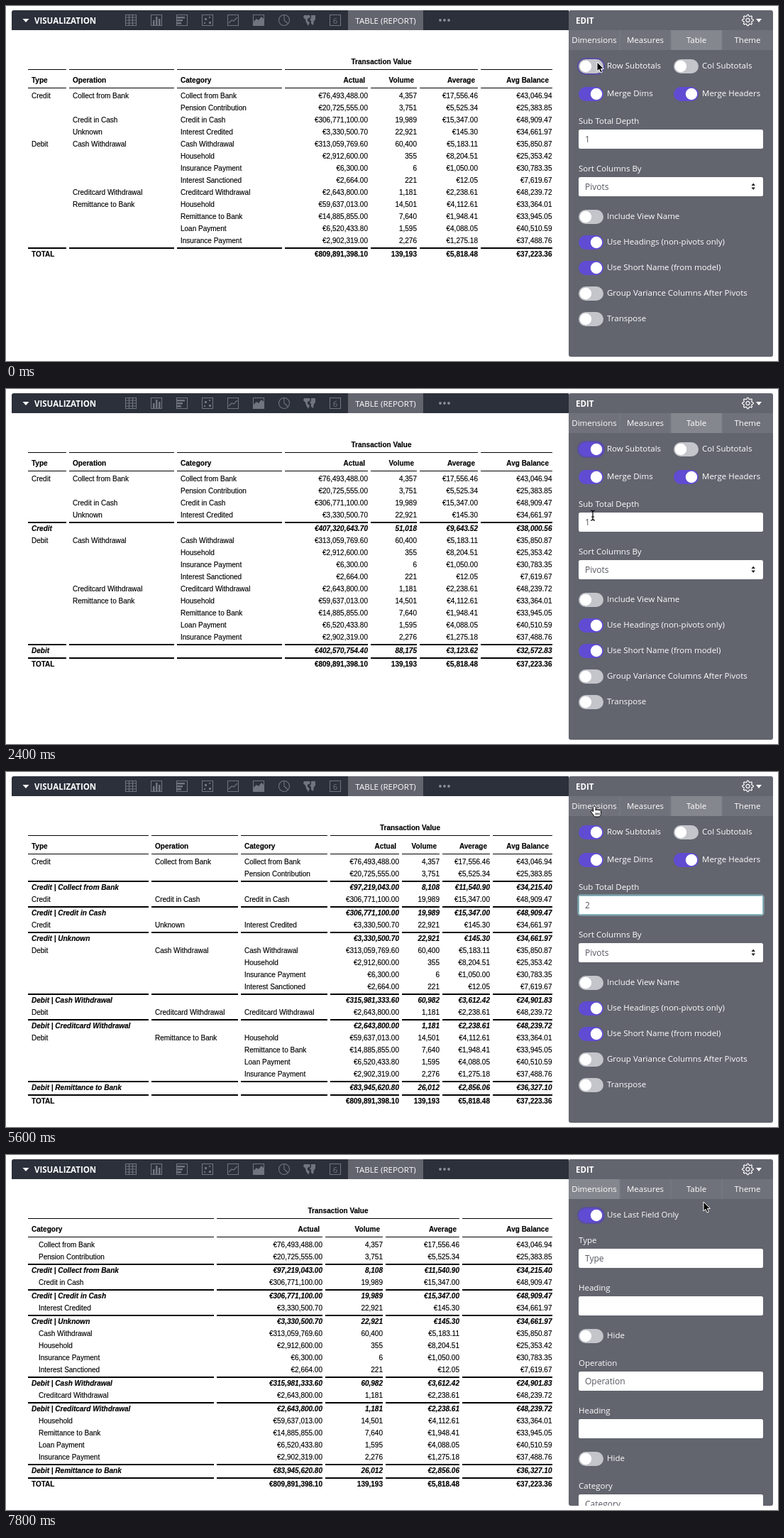
Write an HTML page that moves like this. It is 1088 px wide and 500 px high and loops after 8000 ms.

```html
<!DOCTYPE html>
<html lang="en">
<head>
<meta charset="utf-8">
<title>Table report subtotals</title>
<style>
html, body { margin: 0; width: 100%; height: 100%; overflow: hidden; background: #fff; }
svg { display: block; }
text { white-space: pre; }
.table { font: 10px "Liberation Sans", Arial, sans-serif; fill: #000; }
.table text { stroke: #000; stroke-width: .15; }
.bold { font-weight: 700; }
.sub { font-weight: 700; font-style: italic; }
.ui { font: 11.5px "Open Sans", sans-serif; fill: #fff; }
.ui .title { font-weight: 700; }
.ui .value { font-size: 12px; fill: #565860; }
.end { text-anchor: end; }
.mid { text-anchor: middle; }
.icon { fill: none; stroke: #70747f; stroke-width: 1.1; }
.icon .solid { fill: #70747f; stroke: none; }
</style>
</head>
<body>
<svg id="stage" width="1088" height="500" viewBox="0 0 1088 500"></svg>
<script>
const PURPLE = '#604bd3', PANEL = '#62646e', STEP = 200, LOOP = 8000;

// type / operation / category / actual / volume / average / balance
const rows = `Credit/Collect from Bank/Collect from Bank/76,493,488.00/4,357/17,556.46/43,046.94
Credit/Collect from Bank/Pension Contribution/20,725,555.00/3,751/5,525.34/25,383.85
Credit/Credit in Cash/Credit in Cash/306,771,100.00/19,989/15,347.00/48,909.47
Credit/Unknown/Interest Credited/3,330,500.70/22,921/145.30/34,661.97
Debit/Cash Withdrawal/Cash Withdrawal/313,059,769.60/60,400/5,183.11/35,850.87
Debit/Cash Withdrawal/Household/2,912,600.00/355/8,204.51/25,353.42
Debit/Cash Withdrawal/Insurance Payment/6,300.00/6/1,050.00/30,783.35
Debit/Cash Withdrawal/Interest Sanctioned/2,664.00/221/12.05/7,619.67
Debit/Creditcard Withdrawal/Creditcard Withdrawal/2,643,800.00/1,181/2,238.61/48,239.72
Debit/Remittance to Bank/Household/59,637,013.00/14,501/4,112.61/33,364.01
Debit/Remittance to Bank/Remittance to Bank/14,885,855.00/7,640/1,948.41/33,945.05
Debit/Remittance to Bank/Loan Payment/6,520,433.80/1,595/4,088.05/40,510.59
Debit/Remittance to Bank/Insurance Payment/2,902,319.00/2,276/1,275.18/37,488.76`
  .split('\n').map(r => r.split('/'));

const totals = {
  'Credit': '407,320,643.70/51,018/9,643.52/38,000.56',
  'Debit': '402,570,754.40/88,175/3,123.62/32,572.83',
  'Credit | Collect from Bank': '97,219,043.00/8,108/11,540.90/34,215.40',
  'Credit | Credit in Cash': '306,771,100.00/19,989/15,347.00/48,909.47',
  'Credit | Unknown': '3,330,500.70/22,921/145.30/34,661.97',
  'Debit | Cash Withdrawal': '315,981,333.60/60,982/3,612.42/24,901.83',
  'Debit | Creditcard Withdrawal': '2,643,800.00/1,181/2,238.61/48,239.72',
  'Debit | Remittance to Bank': '83,945,620.80/26,012/2,856.06/36,327.10',
  'TOTAL': '809,891,398.10/139,193/5,818.48/37,223.36'
};

// left edges of the columns; the last entry closes the table
const wide = [31, 89, 241, 393, 514, 583, 669, 774];
const deep = [31, 205, 331, 457, 558, 615, 686, 774];
const flat = [31, 297, 450, 535, 643, 774];

const text = (x, y, s, cls = '') => `<text x="${x}" y="${y}" class="${cls}">${s}</text>`;
const box = (x, y, w, h, fill, more = '') =>
  `<rect x="${x}" y="${y}" width="${w}" height="${h}" fill="${fill}" ${more}/>`;
const path = (d, more = '') => `<path d="${d}" ${more}/>`;

function table(edges, depth, lastOnly) {
  const dims = edges.length - 5;
  let out = '', y = 130;
  const right = i => edges[i + 1] - 4;
  const rule = (y, weight, merged) => edges.slice(0, -1).forEach((x, i) => {
    const end = merged && i >= dims && i < dims + 2 ? edges[i + 1] : right(i);
    out += box(x, y, end - x, weight, '#000');
  });
  const numbers = (values, y, cls) => values.forEach((v, i) =>
    out += text(Math.min(right(dims + i), 769.5), y, (i === 1 ? '' : '€') + v, 'end ' + cls));
  const total = (name, cls) => {
    y += 2;
    rule(y - 13, 2);
    out += text(36, y, name, cls);
    numbers(totals[name].split('/'), y, cls);
    y += 17;
  };

  out += text((edges[dims] + right(dims + 2)) / 2, 82, 'Transaction Value', 'bold mid');
  rule(89, 1, true);
  rule(115, 1);
  const heads = lastOnly ? ['Category'] : ['Type', 'Operation', 'Category'];
  heads.forEach((h, i) => out += text(edges[i] + 5, 108, h, 'bold'));
  ['Actual', 'Volume', 'Average', 'Avg Balance'].forEach((h, i) =>
    out += text(right(dims + i) - 4 - (i === 3), 108, h, 'bold end'));

  const key = (r, n) => r ? r.slice(0, n).join(' | ') : '';
  rows.forEach((r, i) => {
    const prev = rows[i - 1], next = rows[i + 1];
    const fresh = depth && key(prev, depth) !== key(r, depth);
    if (lastOnly) out += text(46, y, r[2]);
    else r.slice(0, 3).forEach((s, c) => {
      if (fresh || c === 2 || key(prev, c + 1) !== key(r, c + 1)) out += text(edges[c] + 5, y, s);
    });
    numbers(r.slice(3), y, '');
    y += 17;
    if (depth && key(next, depth) !== key(r, depth)) total(key(r, depth), 'sub');
  });
  total('TOTAL', 'bold');
  return `<g class="table">${out}</g>`;
}

function icons() {
  const solid = d => path(d, 'class="solid"');
  const frame = path('M-7.5-7.5h15v15h-15z');
  return [
    path('M-7.5-7.5h15v15h-15zM-7.5-4h15M-7.5 0h15M-7.5 4h15M-2.5-7.5v15M2.5-7.5v15'),
    frame + solid('M-5 0h2.5v7H-5zM-1-5h2.5V7H-1zM3-2h2.5v9H3z'),
    frame + solid('M-7-5H4v2.5H-7zM-7-1H1v2.5h-8zM-7 3h6v2.5h-6z'),
    frame + solid('M-4-3h3v3h-3zM2-5h2v2H2zM2 2h3v3H2zM-5 3h2v2h-2z'),
    frame + path('M-6 4l4-4 3 1 5-5'),
    frame + solid('M-7 7V2l4-4 3 2 4-5 3 3v9z'),
    '<circle r="7.5"/>' + path('M0-7.5V0l5.5 5'),
    solid('M-8-7h8l1 3-4 2v3l3 2-2 5-3-5-1-4-3-3zM2-7h6v6L6 1 5 7 2 5V1L0-1l2-2z'),
    frame + text(0, 4.5, '6', 'solid mid')
  ].map((s, i) => `<g transform="translate(${176 + 36 * i} 20)">${s}</g>`).join('');
}

function gear() {
  let teeth = '';
  for (let i = 0; i < 32; i++) {
    const a = (i - .5) * Math.PI / 16, r = i % 4 < 2 ? 7.8 : 5.9;
    teeth += (i ? 'L' : 'M') + (r * Math.cos(a)).toFixed(2) + ' ' + (r * Math.sin(a)).toFixed(2);
  }
  return `<g transform="translate(1045.5 20)" fill="none" stroke="#fff" stroke-width="1.2">
    ${path(teeth + 'z', 'stroke-linejoin="round"')}<circle r="2.6"/></g>` +
    path('M1057 18h8l-4 5z', 'fill="#fff"');
}

// on runs from 0 to 1
function toggle(x, y, label, on, ring) {
  const fill = on === 1 ? PURPLE : on ? '#978bd9' : '#c3c5ca';
  return (ring ? box(x - 1, y - 11, 37, 22, 'none', 'rx="11" stroke="#5647b0" stroke-opacity=".75" stroke-width="2"') : '') +
    box(x, y - 10, 35, 20, fill, 'rx="10"') +
    `<circle cx="${x + 10 + 15 * on}" cy="${y}" r="8.2" fill="#fff"/>` + text(x + 40, y + 3, label);
}

function field(y, label, value, focus) {
  return text(807, y - 8, label) +
    (focus ? box(806, y - .5, 262, 29, 'none', 'rx="4" stroke="#8fc3cc" stroke-opacity=".5" stroke-width="2"') : '') +
    box(807, y + .5, 260, 27, '#fff', 'rx="2.5"') +
    (focus ? box(807.5, y + 1, 259, 26, 'none', 'rx="2" stroke="#8cc4cd"') : '') +
    text(816, y + 18, value, 'value');
}

function tableTab(t) {
  const focus = t >= 2800;
  const caret = focus && t % 1000 < 500;
  return toggle(807, 85, 'Row Subtotals', t < 1400 ? 0 : t < 1600 ? .47 : 1, !focus) +
    toggle(941, 85, 'Col Subtotals', 0) +
    toggle(807, 124, 'Merge Dims', 1) + toggle(941, 124, 'Merge Headers', 1) +
    field(173.5, 'Sub Total Depth', t < 3600 ? '1' : '2', focus) +
    (caret ? box(823, 180, 1, 15, '#444') : '') +
    field(240.5, 'Sort Columns By', 'Pivots') +
    path('M1050.5 253l2.7-3.5 2.7 3.5zM1050.5 255.5l2.7 3.5 2.7-3.5z', 'fill="#222"') +
    ['Include View Name', 'Use Headings (non-pivots only)', 'Use Short Name (from model)',
      'Group Variance Columns After Pivots', 'Transpose']
      .map((s, i) => toggle(807, 297 + 36 * i, s, +(i === 1 || i === 2))).join('');
}

function dimensionsTab(t) {
  return toggle(807, 85, 'Use Last Field Only', t < 7200 ? 0 : t < 7400 ? .47 : 1, t >= 7000) +
    ['Type', 'Operation', 'Category'].map((s, i) => {
      const y = 131.5 + 173 * i;
      return field(y, s, s) + field(y + 67, 'Heading', '') + toggle(807, y + 123.5, 'Hide', 0);
    }).join('');
}

function panel(t) {
  const active = t < 5800 ? 2 : 0;
  const tabs = ['Dimensions', 'Measures', 'Table', 'Theme'].map((s, i) =>
    box(793 + 72 * i, 34, 72, 28, i === active ? '#85878e' : '#70727b') +
    (i ? box(792.5 + 72 * i, 34, 1, 28, '#7b7d86') : '') +
    text(829 + 72 * i, 52, s, 'mid')).join('');
  return `<clipPath id="edge"><rect x="793" y="6" width="288" height="488" rx="3"/></clipPath>
    <g clip-path="url(#edge)">${box(793, 6, 288, 488, PANEL)}${text(803, 24.5, 'EDIT', 'title')}
    ${gear()}${tabs}${active ? tableTab(t) : dimensionsTab(t)}</g>`;
}

const header = path('M11 6H793V34H8V9a3 3 0 0 1 3-3z', 'fill="#2b303b"') +
  box(482, 6, 106, 28, PANEL) + path('M23.5 18h9l-4.5 5z', 'fill="#fff"') +
  text(40, 24.5, 'VISUALIZATION', 'title') + text(535, 24.5, 'TABLE (REPORT)', 'mid') +
  `<g class="icon">${icons()}</g>` +
  [612, 618, 624].map(x => `<circle cx="${x}" cy="20" r="1.9" fill="#8b8e98"/>`).join('');

// time, x, y of the pointer tip
const trail = [[0, 833, 79], [400, 829, 91], [1800, 829, 91], [2400, 827, 178], [4800, 827, 178],
  [5400, 829, 48], [6000, 829, 48], [6800, 828, 90], [7200, 828, 90], [7800, 983, 66]];

function pointer(t) {
  if (t >= 3000 && t < 4800) return '';
  const n = Math.max(1, trail.findIndex(k => k[0] >= t));
  const [t0, x0, y0] = trail[n - 1], [t1, x1, y1] = trail[n];
  const u = (t - t0) / (t1 - t0), e = u * u * (3 - 2 * u);
  const x = x0 + (x1 - x0) * e, y = y0 + (y1 - y0) * e;
  let d, style = 'fill="#000" stroke="#fff"';
  if (y > 174 && y < 201) {
    d = 'M-3-7q3 0 3 2q0-2 3-2M0-5V5M-3 7q3 0 3-2q0 2 3 2M-2 2h4';
    style = 'fill="none" stroke="#000" stroke-width="1.2"';
  } else if (y > 82 && y < 98 || y > 34 && y < 62) {
    d = 'M0 0c-1 0-1.5.8-1.5 1.6V8l-1.2-1.2c-1-.9-2.4 0-1.8 1.2L-1 13c.8 1.4 1.5 2 3 2h4' +
      'c2 0 3.2-1.5 3.4-3.5V7c0-1.6-2-1.8-2.2-.6c-.2-1.6-2.3-1.6-2.6-.3c-.3-1.4-2.4-1.3-2.6 0V1.6C2 .8 1 0 0 0z' +
      'M2.5 9.5v3M4.7 9.5v3M6.9 9.5v3';
    style = 'fill="#fff" stroke="#000"';
  } else d = 'M0 0V13l3-2.7 2 4.8 2.4-1-2-4.7h4.1z';
  return path(d, `${style} stroke-linejoin="round" transform="translate(${x.toFixed(1)} ${y.toFixed(1)})"`);
}

function draw(t) {
  const report = t < 1400 ? table(wide, 0) : t < 4600 ? table(wide, 1)
    : t < 7200 ? table(deep, 2) : table(flat, 2, true);
  stage.innerHTML = report + `<g class="ui">${header}${panel(t)}</g>` + pointer(t);
}

const stage = document.getElementById('stage');
let shown = -1;
function tick(now) {
  const t = Math.floor(now % LOOP / STEP) * STEP;
  if (t !== shown) draw(shown = t);
  requestAnimationFrame(tick);
}
draw(0);
requestAnimationFrame(tick);
</script>
</body>
</html>
```
